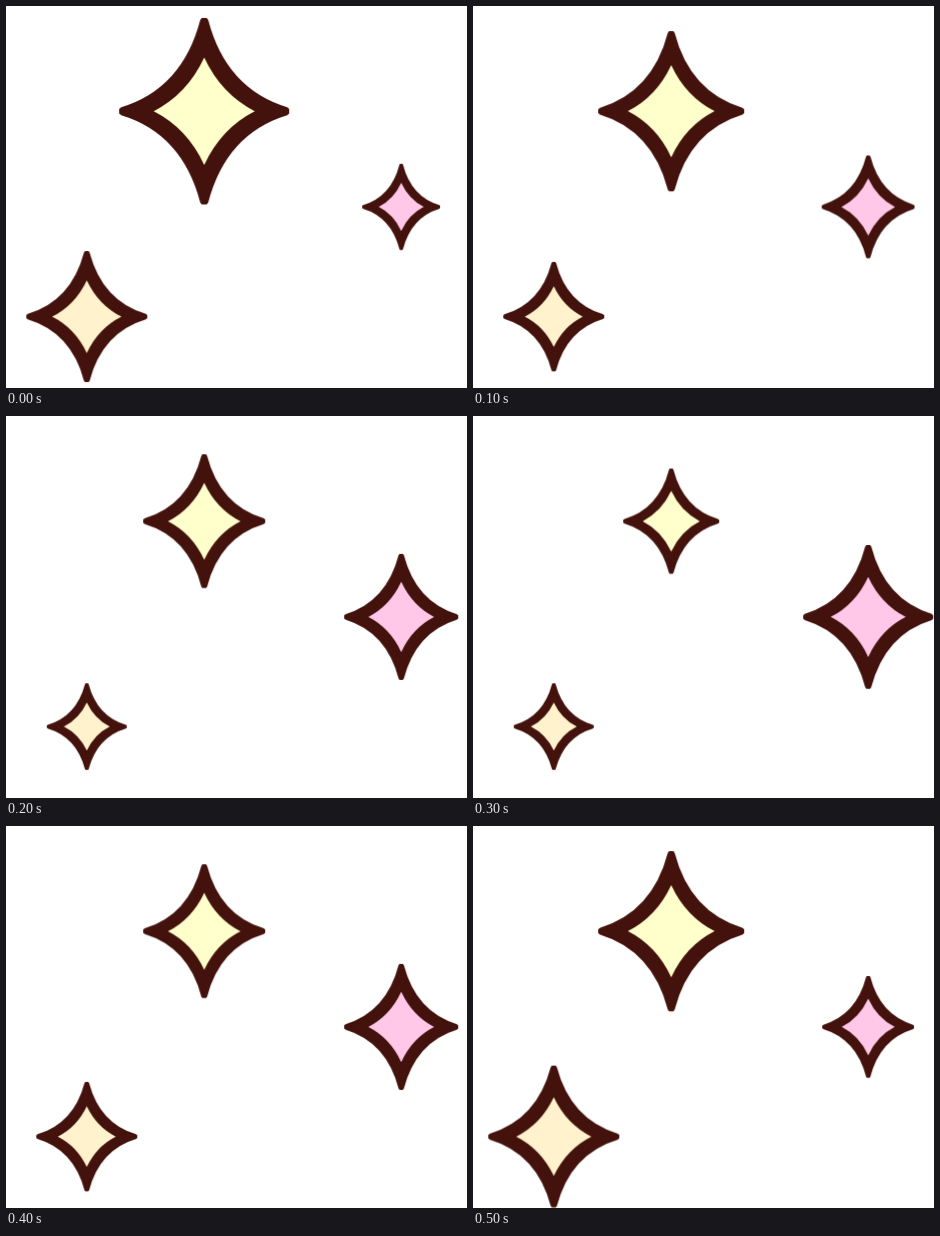
Recreate the animation shown at these times as an HTML page. Size 461 by 382 pixels, loop 0.55 s.

```html
<!DOCTYPE html>
<html lang="en">
<head>
<meta charset="utf-8">
<title>Sparkles</title>
<style>
  html, body { margin: 0; width: 100%; height: 100%; overflow: hidden; background: #fff; }
  svg { display: block; }
</style>
</head>
<body>
<svg id="stage" width="461" height="382" viewBox="0 0 461 382"></svg>
<script>
const STEP = 50, STEPS = 11;
const HALF_W = 85, HALF_H = 93;

// half-width of each star at every step
const stars = [
  { x: 198.2, y: 105.2, fill: '#ffffcb', ratio: 1.097, inner: 1,
    sizes: [85, 79, 73, 68.3, 61, 54.5, 48, 54.5, 61, 68, 73] },
  { x: 395.2, y: 200.9, fill: '#ffc7e8', ratio: 1.105, inner: 0.97,
    sizes: [39, 42.5, 46.5, 52, 57, 61, 65, 61, 57, 52, 46] },
  { x: 80.8, y: 310.6, fill: '#fff2cc', ratio: 1.083, inner: 0.965,
    sizes: [60.5, 55.5, 50.5, 46, 40, 35, 40, 46, 50.5, 58, 65.5] }
];

function add(parent, tag, attrs = {}) {
  const el = document.createElementNS('http://www.w3.org/2000/svg', tag);
  for (const key in attrs) el.setAttribute(key, attrs[key]);
  return parent.appendChild(el);
}

// four concave sides with blunt tips
const OUTLINE =
  'M-2.5-93H2.5L4-91Q22-22.5 83-4L85-2.2V2.2L83 4Q22 22.5 4 91L2.5 93' +
  'H-2.5L-4 91Q-22 22.5-83 4L-85 2.2V-2.2L-83-4Q-22-22.5-4-91Z';
const CORE = 'M0-53.5Q17-17 50.5 0Q17 17 0 53.5Q-17 17-50.5 0Q-17-17 0-53.5Z';

const stage = document.getElementById('stage');

for (const { x, y, fill, ratio, inner, sizes } of stars) {
  const star = add(stage, 'g');
  add(star, 'path', { d: OUTLINE, fill: '#44120c' });
  add(star, 'path', { d: CORE, fill, transform: `scale(${inner})` });

  const pose = w =>
    `translate(${x}px, ${y}px) scale(${w / HALF_W}, ${w * ratio / HALF_H})`;
  const frames = sizes.map((w, i) => ({
    offset: i / STEPS, transform: pose(w), easing: 'step-end'
  }));
  frames.push({ offset: 1, transform: pose(sizes[STEPS - 1]) });
  star.animate(frames, { duration: STEP * STEPS, iterations: Infinity });
}
</script>
</body>
</html>
```
